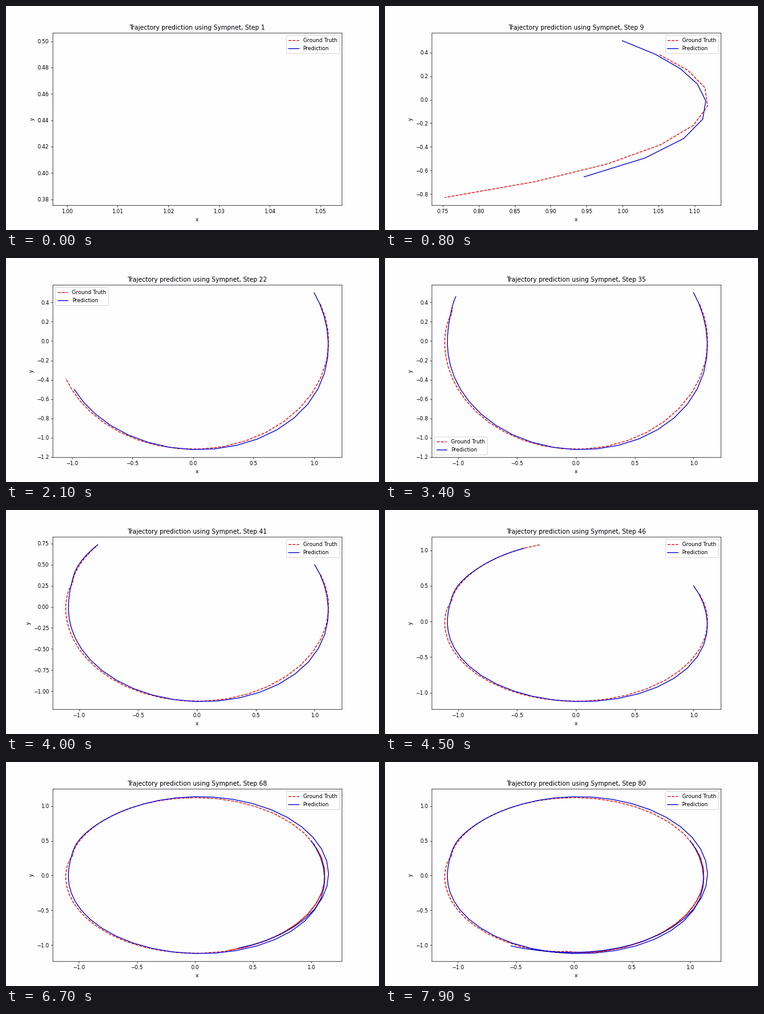
Animation of 600x360 px, one loop 8 s. Source, as a matplotlib script:

```python
import numpy as np
import matplotlib.pyplot as plt
from matplotlib.animation import FuncAnimation

STEPS = 80
DT = 0.1
PAPER, RED, BLUE = "#fefdff", "#e00000", "#0000cd"


def deriv(s):
    """Charged particle in a field |x|, with potential 1 / (100 |x|)."""
    v, x = s[:2], s[2:]
    r = np.hypot(*x)
    force = r * np.array([v[1], -v[0]]) + x / (100 * r**3)
    return np.concatenate([force, v])


def simulate(s, n, sub=20):
    """Velocities at each step, integrated with RK4."""
    h = DT / sub
    out = [s[:2]]
    for _ in range(n):
        for _ in range(sub):
            k1 = deriv(s)
            k2 = deriv(s + h / 2 * k1)
            k3 = deriv(s + h / 2 * k2)
            k4 = deriv(s + h * k3)
            s = s + h / 6 * (k1 + 2 * k2 + 2 * k3 + k4)
        out.append(s[:2])
    return np.array(out)


def spline(t, xk, yk):
    """Natural cubic spline through (xk, yk), evaluated at t."""
    h, n = np.diff(xk), len(xk)
    a, b = np.eye(n), np.zeros(n)
    slope = np.diff(yk) / h
    for i in range(1, n - 1):
        a[i, i - 1:i + 2] = h[i - 1], 2 * (h[i - 1] + h[i]), h[i]
        b[i] = 6 * (slope[i] - slope[i - 1])
    m = np.linalg.solve(a, b)
    i = np.clip(np.searchsorted(xk, t, side="right") - 1, 0, n - 2)
    p, q, d = xk[i + 1] - t, t - xk[i], h[i]
    return ((m[i] * p**3 + m[i + 1] * q**3) / (6 * d)
            + (yk[i] / d - m[i] * d / 6) * p
            + (yk[i + 1] / d - m[i + 1] * d / 6) * q)


def predict(n):
    """Imperfect orbit: smooth path through a few (step, angle, radius) keys."""
    keys = np.array([
        (0, 0.464, 1.118), (4, -0.009, 1.116), (8, -0.605, 1.151),
        (14, -1.578, 1.123), (21, -2.670, 1.100), (27, -3.258, 1.092),
        (34, -3.565, 1.119), (45, -4.309, 1.120), (51, -5.160, 1.148),
        (57, -6.105, 1.154), (70, -7.810, 1.106), (79, -8.345, 1.150)])
    t = np.arange(n)
    step, angle, radius = keys.T
    th, r = spline(t, step, angle), spline(t, step, radius)
    return np.column_stack([r * np.cos(th), r * np.sin(th)])


truth = simulate(np.array([1.0, 0.5, 0.5, 1.0]), STEPS)
pred = predict(STEPS)

fig, ax = plt.subplots(figsize=(10, 6), dpi=60, facecolor=PAPER)


def update(i):
    n = i + 1
    ax.clear()
    ax.set_facecolor(PAPER)
    ax.plot(*truth[1:n + 1].T, "--", color=RED, label="Ground Truth")
    ax.plot(*pred[:n].T, color=BLUE, label="Prediction")
    ax.set_xlabel("x")
    ax.set_ylabel("y")
    ax.set_title(f"Trajectory prediction using Sympnet, Step {n}")
    ax.legend(loc="best")
    return ax.get_lines()


anim = FuncAnimation(fig, update, frames=STEPS, interval=100,
                     init_func=lambda: [], repeat=True, repeat_delay=0)
plt.show()
```
